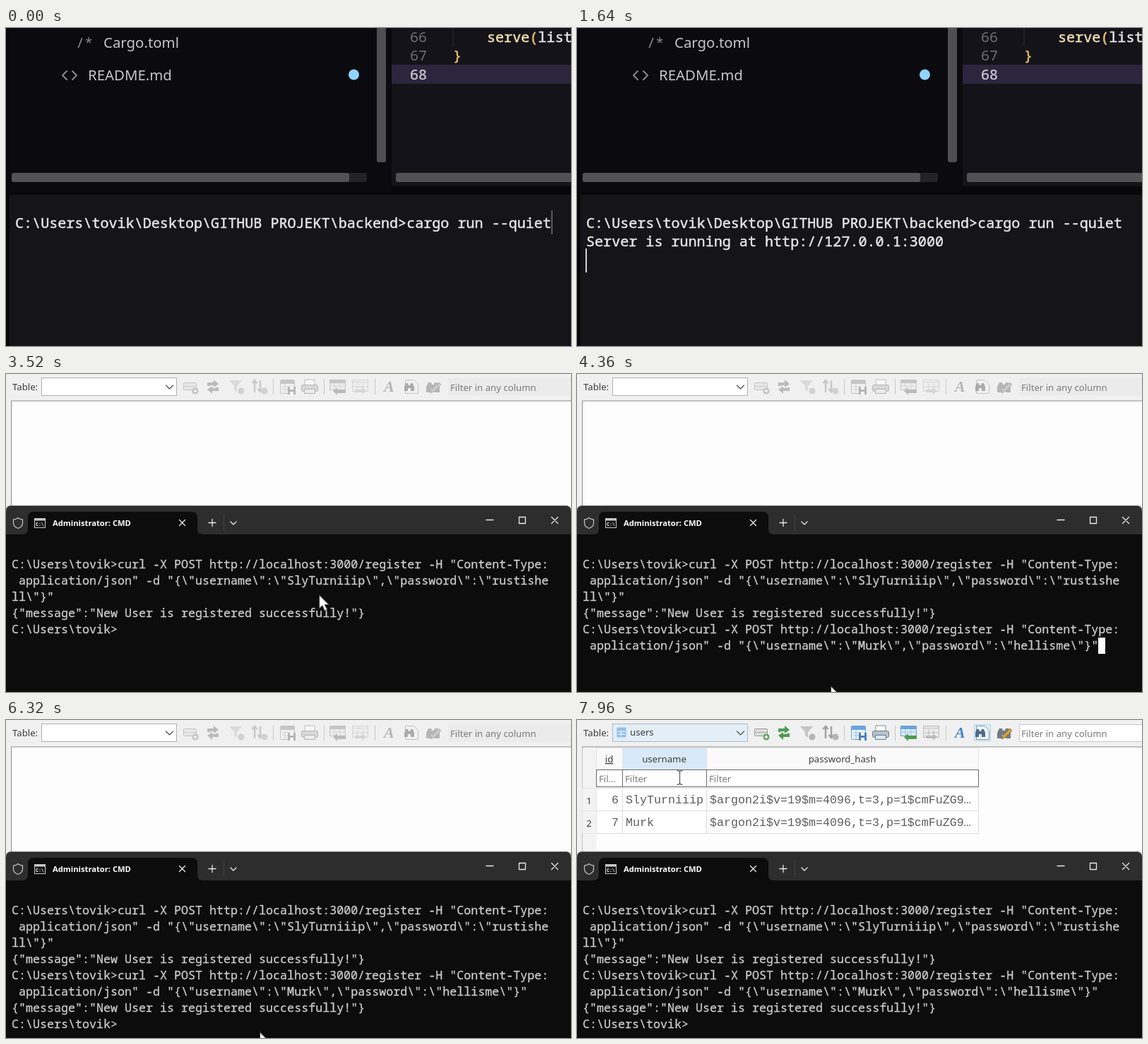
An HTML page that plays this animation: 800 px wide and 450 px high, repeating every 8 s.

```html
<!DOCTYPE html>
<html lang="en">
<head>
<meta charset="utf-8">
<title>Server registration demo</title>
<style>
html, body { margin: 0; width: 100%; height: 100%; overflow: hidden; background: #09090c; }
svg { display: block; width: 100vw; height: 100vh; }
text { white-space: pre; }
.ui { font-family: "Noto Sans", "Open Sans", sans-serif; }
.code { font: 500 20.08px "Noto Sans Mono", monospace; fill: #e6e6e4; stroke: #e6e6e4; stroke-width: .5px; }
.plain { stroke: none; }
.cmd { font: 16.68px "Noto Sans Mono", monospace; fill: #cccccc; stroke: #cccccc; stroke-width: .3px; }
.files { font-size: 20.4px; fill: #c6c6c9; }
.small { font-size: 13.2px; fill: #3c3c3c; }
.cell { font: 16.67px "Liberation Mono", monospace; fill: #5c5c5c; }
.line { fill: none; stroke-linecap: round; stroke-linejoin: round; }
.hint { fill: #7a7a7a; }
.blob { fill: #c8c8c8; font-style: italic; }
.off { filter: grayscale(1) opacity(.5); }

.t { animation: 8s step-end infinite; }
.editor { animation-name: editor; }
.desktop { animation-name: desktop; }
.reply { animation-name: reply; }
.caret1 { animation: caret1 8s linear infinite; }
.caret2 { animation-name: caret2; }
.caret3 { animation: caret3 8s linear infinite; }
.ok1 { animation-name: ok1; }
.paste { animation-name: paste; }
.ok2 { animation-name: ok2; }
.block1 { animation-name: block1; }
.block2 { animation-name: block2; }
.block3 { animation-name: block3; }
.idle { animation-name: idle; }
.live { animation-name: live; }
.migr { animation-name: migr; }
.users { animation-name: users; }
.arrow { animation-name: arrow; }
.mouse { animation: mouse 8s ease-in-out infinite; }

@keyframes editor { 0% { visibility: visible } 23.75%, 100% { visibility: hidden } }
@keyframes desktop { 0% { visibility: hidden } 23.75%, 100% { visibility: visible } }
@keyframes reply { 0% { opacity: 0 } 13.5%, 100% { opacity: 1 } }
@keyframes caret1 { 0% { opacity: .35 } 1.5%, 3% { opacity: 0 } 4.5% { opacity: .8 } 4.99% { opacity: 1 } 5%, 100% { opacity: 0 } }
@keyframes caret2 { 0% { opacity: 0 } 5% { opacity: 1 } 13.5%, 100% { opacity: 0 } }
@keyframes caret3 { 0%, 13.49% { opacity: 0 } 13.5%, 21% { opacity: .95 } 23%, 100% { opacity: 0 } }
@keyframes ok1 { 0% { opacity: 0 } 37%, 100% { opacity: 1 } }
@keyframes paste { 0% { opacity: 0 } 49%, 100% { opacity: 1 } }
@keyframes ok2 { 0% { opacity: 0 } 59%, 100% { opacity: 1 } }
@keyframes block1 { 0% { opacity: 0 } 37% { opacity: 1 } 43.5%, 100% { opacity: 0 } }
@keyframes block2 { 0% { opacity: 0 } 49% { opacity: 1 } 56%, 100% { opacity: 0 } }
@keyframes block3 { 0% { opacity: 0 } 59% { opacity: 1 } 65.5% { opacity: 0 } 71% { opacity: 1 } 77.5%, 100% { opacity: 0 } }
@keyframes idle { 0% { opacity: 1 } 91%, 100% { opacity: 0 } }
@keyframes live { 0% { opacity: 0 } 91%, 100% { opacity: 1 } }
@keyframes migr { 0% { opacity: 0 } 91% { opacity: 1 } 97.5%, 100% { opacity: 0 } }
@keyframes users { 0% { opacity: 0 } 97.5%, 100% { opacity: 1 } }
@keyframes arrow { 0% { opacity: 1 } 97.5%, 100% { opacity: 0 } }
@keyframes mouse {
  0%, 47.5% { transform: translate(443px, 312px) }
  52%, 80% { transform: translate(359px, 441px) }
  87%, 91% { transform: translate(200px, 18px) }
  94%, 100% { transform: translate(143px, 81px) }
}
</style>
</head>
<body>
<svg viewBox="0 0 800 450" xmlns="http://www.w3.org/2000/svg">

<g class="t editor">
  <rect width="800" height="450" fill="#08080b"/>
  <rect x="4" width="541" height="232" fill="#0b0a0f"/>
  <rect x="546" width="254" height="224" fill="#14131a"/>
  <rect x="5" y="236" width="795" height="214" fill="#141419"/>
  <g class="ui files">
    <text x="138" y="28">Cargo.toml</text>
    <text x="116" y="74">README.md</text>
  </g>
  <text class="code plain" x="99" y="28" style="fill:#88888d">/*</text>
  <path class="line" d="M86 61l-6 6 6 6M94 61l6 6-6 6" stroke="#88888d" stroke-width="2"/>
  <circle cx="492.5" cy="66" r="7.5" fill="#90d5ff"/>
  <rect x="525" y="-6" width="13" height="196" rx="3" fill="#4f4f52"/>
  <rect x="480" y="205" width="31" height="13" rx="3" fill="#232326"/>
  <rect x="8" y="205" width="478" height="13" rx="3" fill="#525255"/>
  <rect x="552" y="205" width="260" height="13" rx="3" fill="#525255"/>
  <rect x="546" y="52" width="254" height="27" fill="#2b263d"/>
  <path d="M633 0V26" stroke="#302f36"/>
  <g class="code">
    <g class="plain" fill="#6d6c74"><text x="572" y="20">66</text><text x="572" y="46">67</text></g>
    <text x="572" y="73" fill="#c4c2cc" stroke="#c4c2cc">68</text>
    <text x="681" y="20"><tspan fill="#f3dfae" stroke="#f3dfae">serve</tspan><tspan fill="#efc56b" stroke="#efc56b">(</tspan>listener</text>
    <text x="633" y="46" fill="#efc56b" stroke="#efc56b">}</text>
    <text x="13" y="283">C:\Users\tovik\Desktop\GITHUB PROJEKT\backend>cargo run --quiet</text>
    <text class="t reply" x="13" y="309">Server is running at http://127.0.0.1:3000</text>
  </g>
  <g fill="#dededc">
    <rect class="caret1" x="772" y="258" width="2" height="34"/>
    <rect class="t caret2" x="12" y="285" width="2" height="34"/>
    <rect class="caret3" x="12" y="312" width="2" height="34"/>
  </g>
</g>

<g class="t desktop">
  <rect width="800" height="200" fill="#f0f0f0"/>
  <rect x="7" y="38" width="800" height="160" fill="#fdfdfd"/>
  <path d="M7.5 190V38H800" fill="none" stroke="#8c8c8c"/>
  <text class="ui small" x="9" y="23">Table:</text>
  <path d="M378.5 7V29M450.5 7V29M522.5 7V29" stroke="#c8c8c8"/>

  <!-- toolbar, disabled then enabled -->
  <g class="t idle">
    <rect x="50.5" y="5.5" width="191" height="25" fill="#fff" stroke="#b0b0b0"/>
    <rect x="626" y="6" width="180" height="25" fill="#ebebeb"/>
    <use href="#tools" class="off"/>
  </g>
  <g class="t live">
    <rect x="626.5" y="6.5" width="180" height="24" fill="#fff" stroke="#c8c8c8"/>
    <rect x="562.5" y="6.5" width="23" height="23" fill="#dcecf8" stroke="#b4d4ec"/>
    <g id="tools">
      <g stroke-width="1">
        <rect x="251.5" y="12.5" width="18" height="10" rx="1" fill="#dedede" stroke="#999"/>
        <path d="M251 17.5h19" stroke="#aaa"/>
        <circle cx="268" cy="24" r="4.5" fill="#5fa55b"/>
        <path d="M265.5 24h5M268 21.5v5" stroke="#fff" stroke-width="1.5"/>
      </g>
      <g fill="#4d9c50">
        <path d="M285 17v-5h9v-4l7 6-7 5v-3h-5v1z"/>
        <path d="M301 19v5h-9v4l-7-6 7-5v3h5v-1z"/>
      </g>
      <g class="off">
        <path d="M316 9h18l-7 8v8l-4-3v-5z" fill="#999"/>
        <circle cx="333" cy="24" r="4.5" fill="#777"/>
        <path d="M352 26V9M348.5 13l3.5-4 3.5 4M360 9v16M356.5 21l3.5 4 3.5-4" fill="none" stroke="#555" stroke-width="2.5"/>
        <circle cx="366" cy="24" r="4.5" fill="#777"/>
      </g>
      <rect x="388.5" y="8.5" width="20" height="19" rx="1" fill="#e9f2fb" stroke="#6c9fd0"/>
      <path d="M388 11.5h21" stroke="#6aa4dc" stroke-width="5"/>
      <path d="M391 18h16M391 22h16M395 15v12" stroke="#9cc0e6"/>
      <rect x="399" y="18" width="11" height="11" fill="#4a80ba"/>
      <path d="M402 18h5v4h-5zM402 25h5v4h-5z" fill="#fff"/>
      <path d="M423 8h14v8h-14z" fill="#fff" stroke="#888"/>
      <rect x="418.5" y="15.5" width="23" height="9" rx="2" fill="#b5c3ce" stroke="#6d7b88"/>
      <path d="M422.5 21.5h15v6h-15z" fill="#d9eaf7" stroke="#6d7b88"/>
      <rect x="458.5" y="8.5" width="22" height="14" fill="#dcebfa" stroke="#6c9fd0"/>
      <path d="M458 11h23" stroke="#6aa4dc" stroke-width="4"/>
      <path d="M459 17h21M465 13v9M473 13v9" stroke="#9cc0e6"/>
      <path d="M463 24l6-5v3h12v5h-12v3z" fill="#4d9c50"/>
      <g class="off">
        <rect x="490.5" y="8.5" width="22" height="16" fill="#e8e8e8" stroke="#888"/>
        <path d="M491 11.5h21M491 18h21M498 13v11M505 13v11" stroke="#888"/>
        <path d="M494 22h10v-3l6 5-6 5v-3h-10z" fill="#888"/>
      </g>
      <text x="535" y="25" font-family="Liberation Serif, serif" font-size="22" font-weight="700" font-style="italic" fill="#3f83cc">A</text>
      <path d="M565.5 8.5h12l6 6v13h-18z" fill="#edf4fa" stroke="#7b99b5"/>
      <path d="M564 24v-6l2-5h3l1 3h2l1-3h3l2 5v6h-5v-4h-4v4z" fill="#4a6a8a"/>
      <path d="M595 26v-8l3-6h4l1 3h3l1-3h4l3 6v8h-7v-5h-5v5z" fill="#717d86"/>
      <path d="M601 27l2-5 10-10 3 3-10 10z" fill="#d6a040" stroke="#85672b" stroke-width=".8"/>
    </g>
  </g>
  <text class="ui small hint" x="629" y="24">Filter in any column</text>

  <g id="migr" class="t migr"></g>
  <g id="users" class="t users"></g>
  <path class="line" d="M226.5 16l5 5 5-5" stroke="#555" stroke-width="1.3"/>

  <!-- console window -->
  <path d="M0 450V194q0-8 8-8H792q8 0 8 8V450z" fill="#2d2d2d"/>
  <path d="M0 194q0-7.5 8-7.5H792q8 0 8 7.5" fill="none" stroke="#6a6a6a"/>
  <path d="M23 227q8 0 8-8v-16q0-8 8-8H263q8 0 8 8v16q0 8 8 8z" fill="#0c0c0c"/>
  <rect y="227" width="800" height="223" fill="#0c0c0c"/>
  <path class="line" d="M17 203.5q3 2.5 6.5 2.5v5q0 5-6.5 7.5-6.5-2.5-6.5-7.5v-5q3.5 0 6.5-2.5z" stroke="#b8b8b8" stroke-width="1.3"/>
  <rect x="40.5" y="204.5" width="15" height="13" fill="#111" stroke="#c8c8c8"/>
  <path d="M40 206h16" stroke="#c8c8c8" stroke-width="3"/>
  <text x="42" y="214.5" font-family="Liberation Mono, monospace" font-size="6.5" font-weight="700" fill="#fff">C:\</text>
  <text class="ui" x="66" y="215" font-size="11.2" font-weight="700" fill="#fff">Administrator: CMD</text>
  <g class="line" stroke="#e8e8e8" stroke-width="1.3">
    <path d="M245.5 206.5l8 8M253.5 206.5l-8 8M287 210.5h10M292 205.5v10M318 209l4 4 4-4"/>
    <path d="M680 206.5h10M726.5 202.5h9v9h-9zM772.5 202.5l9 9M781.5 202.5l-9 9"/>
  </g>
  <path d="M308.5 199V222" stroke="#444"/>

  <g class="cmd" transform="translate(0 -.7)">
    <text x="8" y="275.5">C:\Users\tovik>curl -X POST http://localhost:3000/register -H "Content-Type:</text>
    <text x="8" y="298.5"> application/json" -d "{\"username\":\"SlyTurniiip\",\"password\":\"rustishe</text>
    <text x="8" y="321.5">ll\"}"</text>
    <g class="t ok1">
      <text x="8" y="344.5">{"message":"New User is registered successfully!"}</text>
      <text x="8" y="367.5">C:\Users\tovik></text>
    </g>
    <g class="t paste">
      <text x="158" y="367.5">curl -X POST http://localhost:3000/register -H "Content-Type:</text>
      <text x="8" y="390.5"> application/json" -d "{\"username\":\"Murk\",\"password\":\"hellisme\"}"</text>
    </g>
    <g class="t ok2">
      <text x="8" y="413.5">{"message":"New User is registered successfully!"}</text>
      <text x="8" y="436.5">C:\Users\tovik></text>
    </g>
  </g>
  <g fill="#fff">
    <rect class="t block1" x="158" y="350" width="10" height="23"/>
    <rect class="t block2" x="738" y="373" width="10" height="23"/>
    <rect class="t block3" x="158" y="419" width="10" height="23"/>
  </g>

  <g class="mouse">
    <path class="t arrow" d="M.5 .5V20l4.5-4 3.3 7.5 3.6-1.6L8.6 14.5H14.5z" fill="#fff" stroke="#333" stroke-width="1.1" stroke-linejoin="round"/>
    <path class="t users" d="M-1.5 -9.5q3.5 0 4 2 .5-2 4-2M2.5 -7.5v16M-1.5 10.5q3.5 0 4-2 .5 2 4 2" fill="none" stroke="#555" stroke-width="1.2"/>
  </g>
</g>
</svg>

<script>
const rect = (x, y, w, h, fill, stroke = "none") =>
  `<rect x="${x + .5}" y="${y + .5}" width="${w}" height="${h}" fill="${fill}" stroke="${stroke}"/>`;
const text = (x, y, s, cls, anchor = "start", attrs = "") =>
  `<text x="${x}" y="${y}" class="${cls}" text-anchor="${anchor}" ${attrs}>${s}</text>`;

const combo = (name, fill, border) =>
  rect(50, 5, 191, 25, fill, border) + rect(56, 10, 13, 14, "#8fc0e8") +
  '<path d="M58 16h10M58 20h10M62 15v8" stroke="#fff"/>' + text(75, 22, name, "ui small");

// cols: [title, right edge, cell alignment]
function table(id, head, cols, rows, hover) {
  let out = head + rect(7, 39, 20, 150, "#f3f3f3");
  let left = 27;
  cols.forEach(([title, right, align], c) => {
    const w = right - left;
    out += rect(left, 39, w, 31, c === hover ? "#d8eafa" : "#fafafa", "#e4e4e4");
    out += text(left + w / 2, 60, title, "ui small", "middle", c ? "" : 'text-decoration="underline"');
    out += rect(left, 70, w, 24, "#fff", "#6a6a6a");
    out += text(left + 4, 88, w < 40 ? "Fil…" : "Filter", "ui small hint");
    rows.forEach((row, r) => {
      const y = 96 + r * 32;
      out += rect(left, y, w, 32, "#fff", "#dcdcdc");
      out += text(align === "end" ? right - 5 : left + 5, y + 22, row[c],
        row[c] === "BLOB" ? "cell blob" : "cell", align);
    });
    left = right;
  });
  rows.forEach((_, r) => {
    const y = 96 + r * 32;
    out += rect(7, y, 20, 32, "#f3f3f3", "#e4e4e4") + text(17, y + 23, r + 1, "ui small", "middle");
  });
  document.getElementById(id).innerHTML = out;
}

table("migr", combo("_sqlx_migrations", "#cfe5f7", "#5a97c8"), [
  ["version", 177, "start"], ["description", 306, "start"], ["installed_on", 506, "start"],
  ["success", 571, "end"], ["checksum", 652, "start"], ["execution_time", 775, "end"]
], [["20250722011558", "create users", "2025-07-22 01:24:50", "1", "BLOB", "7031600"]]);

const hash = "$argon2i$v=19$m=4096,t=3,p=1$cmFuZG9…";
table("users", combo("users", "#e4eef6", "#a9bccb"), [
  ["id", 64, "end"], ["username", 183, "start"], ["password_hash", 568, "start"]
], [["6", "SlyTurniiip", hash], ["7", "Murk", hash]], 1);
</script>
</body>
</html>
```
